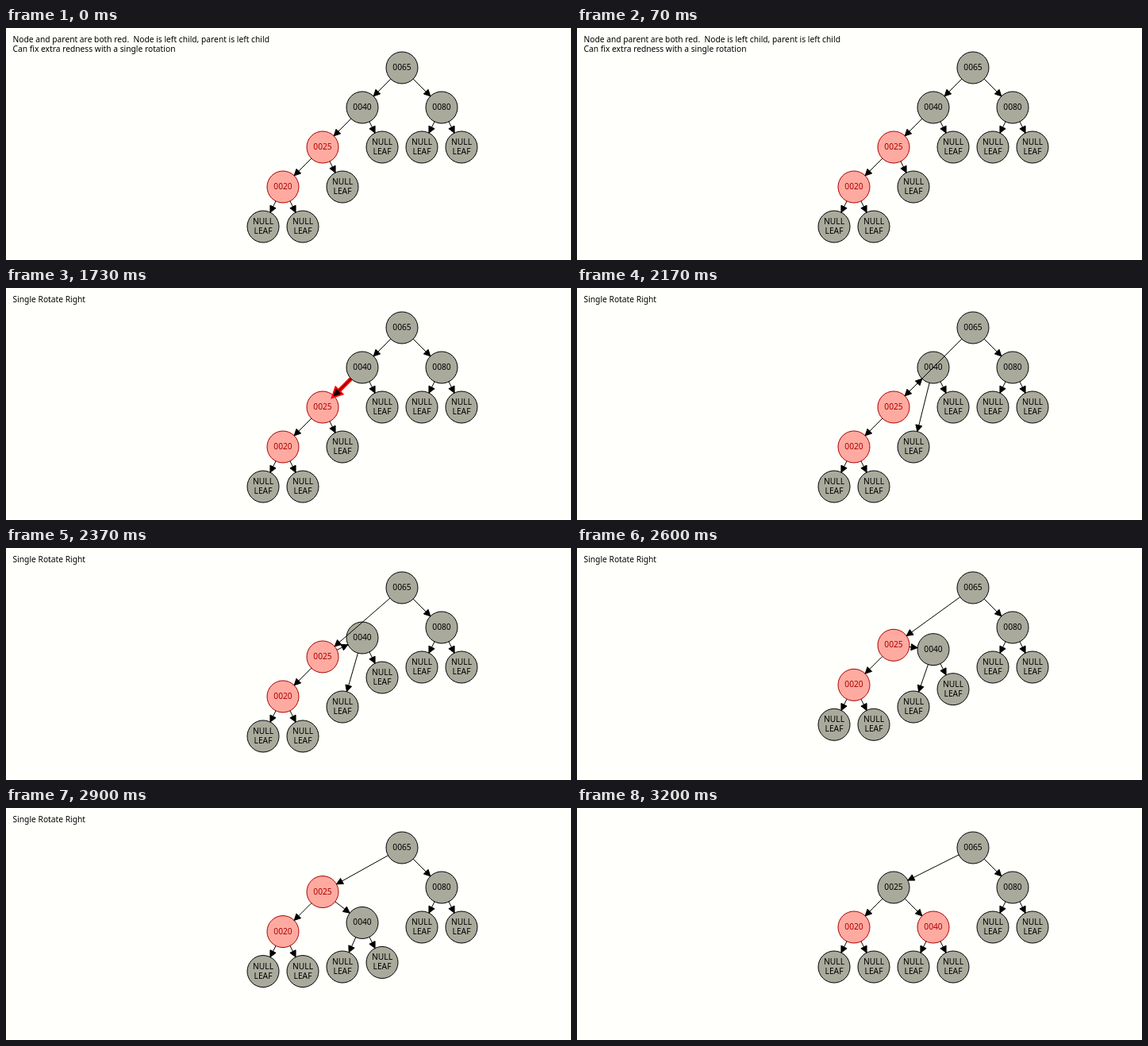
Write an HTML page with a canvas that moves like this. It is 712x292 px and loops after 6130 ms.

```html
<!DOCTYPE html>
<html lang="en">
<head>
<meta charset="utf-8">
<title>Red-black tree: single rotation</title>
<style>
  html, body { margin: 0; width: 100%; height: 100%; overflow: hidden; background: #fffffb; }
  canvas { display: block; }
</style>
</head>
<body>
<canvas id="stage" width="712" height="292"></canvas>
<script>
const ctx = document.getElementById('stage').getContext('2d');
const LOOP = 6130, TICK = 100 / 3, RADIUS = 20;
const ROTATE = 1300, REWIRE = 2170, RECOLOR = 3030;

const BLACK = { line: '#000', fill: '#aaaa9c' };
const RED = { line: '#aa0000', fill: '#ffaaa0' };

// x, y, direction of travel during the rotation, label
const NODES = {
  root:  [499, 50, 0, '0065'],
  n40:   [449, 100, 1, '0040'],
  n80:   [549, 100, 0, '0080'],
  n25:   [399, 150, -1, '0025'],
  n20:   [349, 200, -1, '0020'],
  leafA: [324, 250, -1],
  leafB: [374, 250, -1],
  leafC: [424, 200, 0],
  leafD: [474, 150, 1],
  leafE: [524, 150, 0],
  leafF: [574, 150, 0]
};

const FIXED_EDGES = [
  ['root', 'n80'], ['n80', 'leafE'], ['n80', 'leafF'], ['n40', 'leafD'],
  ['n25', 'n20'], ['n20', 'leafA'], ['n20', 'leafB']
];
const OLD_EDGES = [['root', 'n40'], ['n25', 'leafC'], ['n40', 'n25']];
const NEW_EDGES = [['root', 'n25'], ['n40', 'leafC'], ['n25', 'n40']];

const MESSAGES = [
  [0, ['Node and parent are both red.  Node is left child, parent is left child',
       'Can fix extra redness with a single rotation']],
  [ROTATE, ['Single Rotate Right']],
  [RECOLOR, []]
];

// Time and distance moved
const SHIFT = [[2166, 0], [2366, 13], [2600, 27.7], [2766, 37], [3000, 50]];

function shiftAt(t) {
  if (t <= SHIFT[0][0]) return 0;
  for (let i = 1; i < SHIFT.length; i++) {
    const [t0, d0] = SHIFT[i - 1], [t1, d1] = SHIFT[i];
    if (t < t1) return d0 + (d1 - d0) * (t - t0) / (t1 - t0);
  }
  return 50;
}

// Width of the highlight, pulsing every 14 ticks
function pulseWidth(t) {
  const phase = (Math.round((t - ROTATE) / TICK) + 10) / 14;
  return 3 + Math.floor(Math.abs(phase % 1 - 0.5) * 11 + 0.5);
}

function drawNode([x, y, label], style) {
  ctx.fillStyle = style.fill;
  ctx.strokeStyle = style.line;
  ctx.lineWidth = 1;
  ctx.beginPath();
  ctx.arc(x, y, RADIUS, 0, Math.PI * 2);
  ctx.fill();
  ctx.stroke();
  ctx.fillStyle = style.line;
  ctx.textAlign = 'center';
  if (label) {
    ctx.fillText(label, x, y + 3);
  } else {
    ctx.fillText('NULL', x, y - 3);
    ctx.fillText('LEAF', x, y + 9);
  }
}

function drawArrow([ax, ay], [bx, by], width, color) {
  const len = Math.hypot(bx - ax, by - ay);
  const ux = (bx - ax) / len, uy = (by - ay) / len;
  const tipX = bx - ux * RADIUS, tipY = by - uy * RADIUS;
  const backX = tipX - ux * 8, backY = tipY - uy * 8;
  ctx.strokeStyle = ctx.fillStyle = color;
  ctx.lineWidth = width;
  ctx.beginPath();
  ctx.moveTo(ax + ux * RADIUS, ay + uy * RADIUS);
  ctx.lineTo(tipX, tipY);
  ctx.stroke();
  ctx.beginPath();
  ctx.moveTo(backX - uy * 4, backY + ux * 4);
  ctx.lineTo(tipX, tipY);
  ctx.lineTo(backX + uy * 4, backY - ux * 4);
  ctx.closePath();
  ctx.stroke();
  ctx.fill();
}

function draw(time) {
  const t = Math.floor((time + 4) / TICK) * TICK + 4;
  const shift = shiftAt(t - 4);
  const reds = t < RECOLOR ? ['n25', 'n20'] : ['n20', 'n40'];
  const at = {};

  ctx.fillStyle = '#fffffb';
  ctx.fillRect(0, 0, 712, 292);
  ctx.font = '10.25px "Noto Sans", "Open Sans", sans-serif';

  for (const [id, [x, y, dir, label]] of Object.entries(NODES)) {
    at[id] = [x, y + dir * shift, label];
    drawNode(at[id], reds.includes(id) ? RED : BLACK);
  }

  if (t >= ROTATE && t < REWIRE) drawArrow(at.n40, at.n25, pulseWidth(t), '#f00');
  for (const [a, b] of FIXED_EDGES.concat(t < REWIRE ? OLD_EDGES : NEW_EDGES)) {
    drawArrow(at[a], at[b], 1, '#000');
  }

  const lines = MESSAGES.filter(m => t >= m[0]).pop()[1];
  ctx.fillStyle = '#000';
  ctx.textAlign = 'left';
  lines.forEach((line, i) => ctx.fillText(line, 8.5, 18 + i * 12));
}

const start = performance.now();
function frame() {
  draw((performance.now() - start) % LOOP);
  requestAnimationFrame(frame);
}
frame();
</script>
</body>
</html>
```
